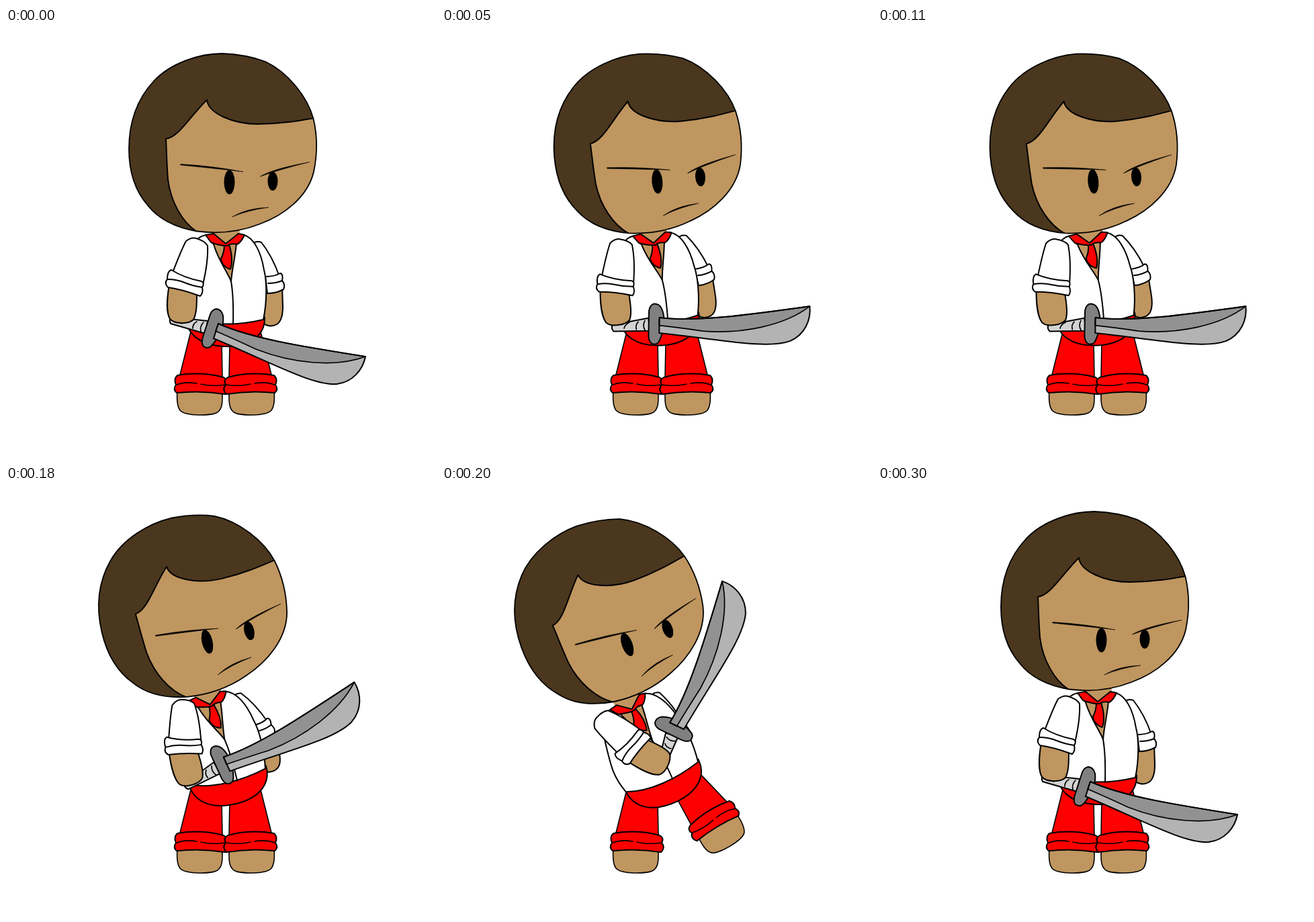
An HTML page with a canvas that plays this animation: 640 px wide and 640 px high, repeating every 350 ms.

```html
<!DOCTYPE html>
<html lang="en">
<head>
<meta charset="utf-8">
<title>Sword swing</title>
<style>
html, body { margin: 0; height: 100%; overflow: hidden; background: #fff; }
canvas { display: block; width: 100%; height: 100%; }
</style>
</head>
<body>
<canvas id="stage" width="640" height="640"></canvas>
<script>
const ctx = document.getElementById('stage').getContext('2d');
const SKIN = '#bf965f', HAIR = '#4a371d', RED = '#f00', WHITE = '#fff', INK = '#000';

// Rest-pose joint of each part
const joints = {
  head: [323, 171.5], body: [327, 322], nearArm: [266, 380],
  farArm: [401, 380], sword: [308, 447], leg: [365, 529]
};

// Joint position and turn in degrees
const rest = {};
for (const k in joints) rest[k] = [...joints[k], 0];
const poses = {
  rest,
  lift: {
    ...rest, head: [306, 171.5, -4.8], body: [315, 321, -5], nearArm: [258, 383, -9],
    farArm: [392, 367, -7], sword: [318, 440, -16.9]
  },
  raise: {
    ...rest, head: [277, 177.5, -13.2], body: [304, 326, -14.3], nearArm: [264, 387, -17],
    farArm: [386, 362, -15], sword: [322.5, 414, -42.4]
  },
  peak: {
    head: [247, 184.8, -19.9], body: [283, 333, -25], nearArm: [284, 388, -66],
    farArm: [355, 364, -10], sword: [345, 361, -82.3], leg: [404, 496, -29.5]
  },
  slash: {
    head: [302.5, 173.5, -5.7], body: [320, 326, -0.5], nearArm: [293, 391, -27],
    farArm: [381, 384, -1], sword: [361, 408, -47], leg: [379, 512, -12], streaks: true
  }
};
const timeline = [[50, 'rest'], [150, 'lift'], [200, 'raise'], [250, 'peak'], [300, 'slash'], [350, 'rest']];
const LOOP = 350;

function shape(d, fill, line = 2) {
  const p = new Path2D(d);
  if (fill) { ctx.fillStyle = fill; ctx.fill(p); }
  if (line) { ctx.lineWidth = line; ctx.strokeStyle = INK; ctx.stroke(p); }
}

function eye(x, y, rx, ry) {
  ctx.fillStyle = INK;
  ctx.beginPath();
  ctx.ellipse(x, y, rx, ry, 0, 0, Math.PI * 2);
  ctx.fill();
}

function place(pose, name, draw) {
  const [x, y, deg] = pose[name], [jx, jy] = joints[name];
  ctx.save();
  ctx.translate(x, y);
  ctx.rotate(deg * Math.PI / 180);
  ctx.translate(-jx, -jy);
  draw();
  ctx.restore();
}

function leg() {
  shape('M255 540C254 552 254 562 259 569C267 578 309 578 316 571C323 565 322 552 322 541Z', SKIN, 1.6);
  shape('M276 448L258 520H322L321 468Z', RED, 1.6);
  shape('M255 517Q290 511 324 520Q331 524 327 531Q333 538 326 545Q290 539 254 543Q248 538 253 531Q249 523 255 517Z', RED);
  shape('M254 531Q267 526 284 529M290 530Q308 534 326 531', null, 1.5);
}

function mirroredLeg() {
  ctx.translate(654, 0);
  ctx.scale(-1, 1);
  leg();
}

function farArm() {
  shape('M388 388L383 438C386 444 396 445 403 441C411 436 412 425 412 415L411 385Z', SKIN);
  shape('M366 322Q372 316 380 319C392 334 400 350 407 370L386 376Z', WHITE);
  shape('M386 370Q400 370 408 365Q413 366 411 376Q416 382 413 389Q402 395 389 395Z', WHITE);
  shape('M390 380Q402 380 411 376');
}

function body() {
  shape('M306 300H348L345 330L335 378L308 325Z', SKIN, 0);
  shape('M267 429C268 452 285 474 331 474C366 473 386 456 385 430Z', RED);
  shape('M298 308C282 310 275 326 270 350C263 385 259 400 267 429C300 444 345 443 383 434C389 405 388 375 384 360C380 336 370 310 350 307L343 321C341 342 337 355 335 377C328 360 317 348 309 322Z', WHITE);
  shape('M335 377Q339 400 338 441');
  shape('M325 322L332 322C337 338 337 350 334 359C326 357 320 350 320 343Q325 334 325 322Z', RED);
  shape('M297 308L309 306L327 321L346 306L355 308Q350 319 344 322Q335 320 330 324H324Q312 322 305 319Z', RED);
}

function head() {
  const p = new Path2D('M322 38C346 39 370 44 386 50C420 66 449 103 457.5 135C464 162 463 190 458 214C449 252 413 279 377 292C349 303 318 307 284 302.5C258 298 229 287 211 264C190 240 183 210 183 180C183 142 194 107 220 79C245 52 288 38 322 38Z');
  ctx.fillStyle = HAIR;
  ctx.fill(p);
  ctx.save();
  ctx.clip(p);
  shape('M299 107C301 127 338 143 375 143C410 143 436 138 470 132V330H300L284 303C262 289 245 258 241 225C239 200 239 180 238 165C257 163 275 130 299 107Z', SKIN);
  ctx.restore();
  ctx.lineWidth = 1.8;
  ctx.strokeStyle = INK;
  ctx.stroke(p);
  eye(332.5, 229.5, 8, 18);
  eye(397, 228, 7.5, 14);
  shape('M260 202.5Q310 205.5 353 214Q310 209 260 204Z', INK, .5);
  shape('M379 220.5Q399 209 452 199.5Q402 212 379 221Z', INK, .5);
  shape('M337 281Q358 268 391 267Q359 271.5 337 281Z', INK, .5);
}

function sword() {
  shape('M246 430L300 436L297 455L245 440Q242 434 246 430Z', '#d3d3d3');
  shape('M271 434Q264 435 261 440M284 437Q278 440 278 447M294 438Q288 444 290 452', null, 1.7);
  shape('M313 418Q321 419 323 428C325 443 318 460 305 474Q300 478 294 474Q290 469 293 460L304 426Q307 419 313 418Z', '#808080');
  shape('M316 440C365 462 440 474 535 489C531 509 516 527 492 530C455 532 395 498 309 462Z', '#b3b3b3', 0);
  shape('M316 440C365 462 440 474 535 489C490 506 425 499 372 478Q340 463 312 451Z', '#929292', 1.7);
  shape('M316 440C365 462 440 474 535 489C531 509 516 527 492 530C455 532 395 498 309 462Z');
}

function nearArm() {
  shape('M243 382C239 405 239 425 244 433C251 441 272 441 279 434C284 425 284 410 284 392Z', SKIN);
  shape('M248 364C255 346 261 330 268 317Q276 311 283 313Q296 317 300 324C301 342 297 365 293 382Z', WHITE);
  shape('M246 360Q265 372 291 377Q296 380 292 386Q294 394 289 399Q262 389 241 386Q235 380 240 374Q240 362 246 360Z', WHITE);
  shape('M240 374Q254 374 266 379Q278 384 292 386');
}

function streaks() {
  ctx.strokeStyle = '#929292';
  ctx.lineWidth = 5.5;
  ctx.stroke(new Path2D('M417 304Q431 318 435 336M457 258Q482 274 492 296M481 265Q503 283 507 303M445 306Q455 316 460 332M457 309Q468 318 468 329M468 282Q479 300 481 322M473 283Q490 297 492 316M484 279Q497 292 500 309'));
}

function draw(pose) {
  ctx.fillStyle = WHITE;
  ctx.fillRect(0, 0, 640, 640);
  leg();
  place(pose, 'leg', mirroredLeg);
  place(pose, 'farArm', farArm);
  place(pose, 'body', body);
  place(pose, 'head', head);
  if (pose.streaks) streaks();
  place(pose, 'sword', sword);
  place(pose, 'nearArm', nearArm);
}

let start;
function tick(now) {
  start ??= now;
  const t = (now - start) % LOOP;
  draw(poses[timeline.find(([end]) => t < end)[1]]);
  requestAnimationFrame(tick);
}

ctx.lineJoin = ctx.lineCap = 'round';
requestAnimationFrame(tick);
</script>
</body>
</html>
```
